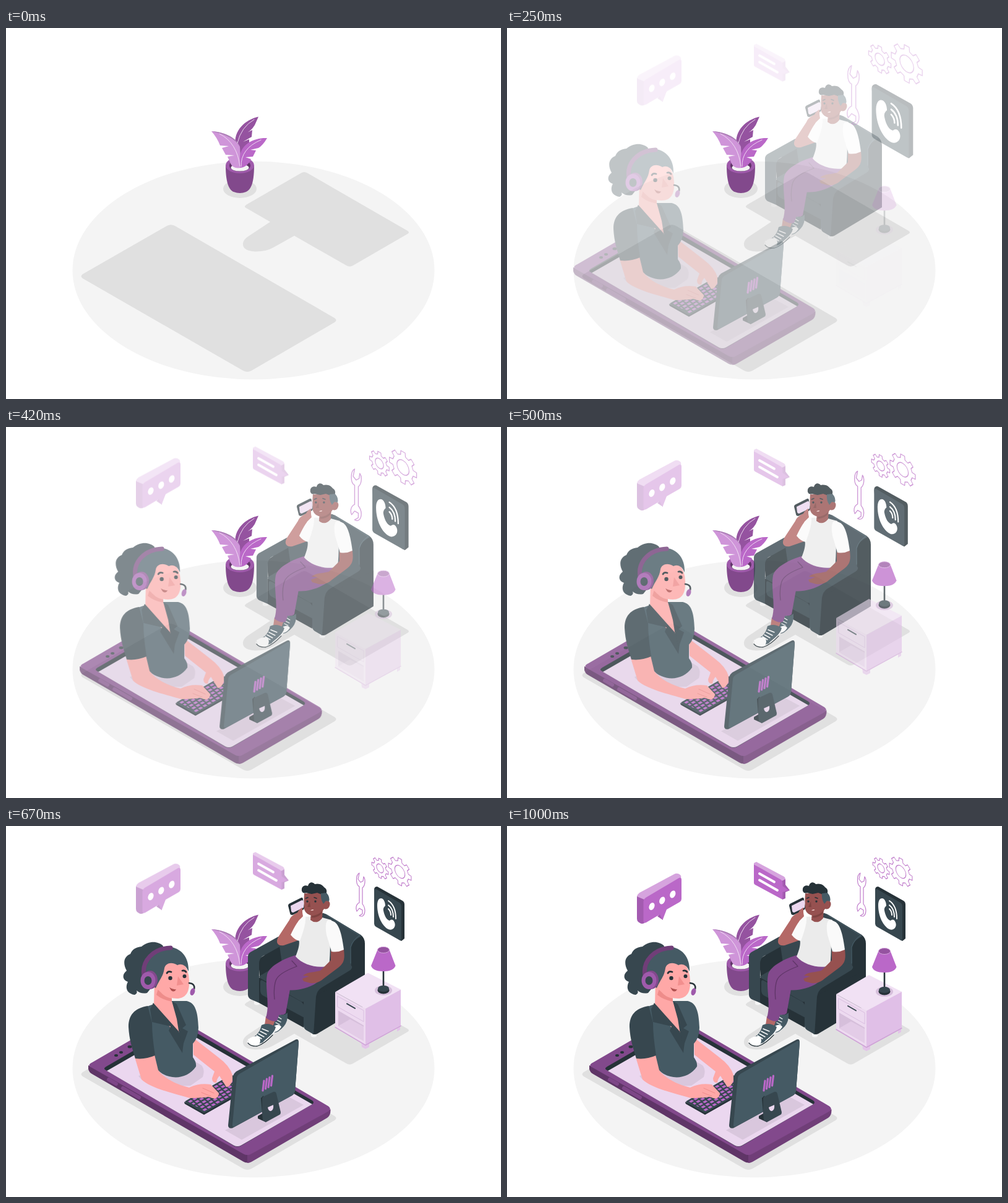
Animation, 800 px wide and 600 px high, one loop 1.04 s. Source, as an HTML page:

```html
<!DOCTYPE html>
<html lang="en">
<head>
<meta charset="utf-8">
<title>Phone support</title>
<style>
html, body { margin: 0; width: 100%; height: 100%; overflow: hidden; background: #fff; }
svg { display: block; width: 800px; height: 600px; }
.d { fill: #263238 } .m { fill: #37474f } .s { fill: #455a64 }
.p { fill: #ba68c8 } .q { fill: #82498c } .r { fill: #703e78 } .t { fill: #5f3567 }
.pale { fill: #ebd7ef } .haze { fill: #d9c7dd } .w { fill: #fff }
.skin { fill: #ffa8a7 } .tan { fill: #b46866 } .brown { fill: #965150 }
.line { fill: none; stroke-linecap: round; stroke-linejoin: round; }
</style>
</head>
<body>
<svg viewBox="0 0 800 600">
  <ellipse cx="400" cy="392" rx="292.5" ry="176.5" fill="#f4f4f4"/>
  <g fill="#e0e0e0">
    <path d="M260 320Q266.5 316.5 273 320L531 469Q536 472.5 531 476L397 554Q390 558 383 554L124 405Q119 401.5 124 398Z"/>
    <path d="M477 234.5Q482 231.500 487 234.500L649 328Q653 330.500 649 333L561 384Q555.500 387.500 550 384L466 336L432 355C418 363 396 363 388 358C380 353 382 344 390 338L427 313.500L388 291Q384 289 388 286Z"/>
    <ellipse cx="378" cy="260" rx="27" ry="15"/>
  </g>

  <g id="plant">
    <path class="q" d="M355 222C355 249 360 262 368 265Q378 269 388 265C397 261 401 248 401 222Z"/>
    <ellipse cx="378" cy="222" rx="23" ry="13" fill="#9f5aab"/>
    <ellipse cx="378" cy="222.500" rx="17" ry="9.500" class="t"/>
    <ellipse cx="378" cy="226" rx="14.500" ry="5.500" fill="#f4f4f4"/>
    <path fill="#9553a0" d="M408 143.500C387 148 367 166 371 190L376 212L384 203L393 188L393 180L383 184L397 176L398 165L386 171Q396 167 402 157Z"/>
    <path fill="#cf95d9" d="M332 167C352 168 373 178 378 192L380 226C369 228 364 223 362 217L358 208L369 206L355 205L349 194L360 191L346 190Q341 177 332 167Z"/>
    <path fill="#ab7fb5" d="M332 167C354 168 374 178 378 193Q370 175 332 167Z"/>
    <path class="p" d="M422 178C402 177 380 187 378 208L378 226C387 226 394 218 396 212L387 209L399 208L404 198L395 197L408 194Q415 190 422 178Z"/>
    <path class="line" stroke="#f3e5f5" stroke-width=".9" d="M345 171Q374 186 378 224M374 186Q380 160 401 148M380 224Q379 195 412 181"/>
  </g>

  <g id="chair">
    <path fill="#f5f5f5" d="M401 282h9v6q-4 3-9 0zM493 334h9v6q-4 3-9 0z"/>
    <path class="d" d="M420 195L498 144Q508 138 518 143L573 176Q580 181 580 190L580 285Q580 290 576 292L503 335L408 285Z"/>
    <path class="m" d="M420 195L498 144Q508 138 518 143L573 176L575 178Q561 184 557 196L558 228L500 262L425 250Z"/>
    <path class="line" stroke="#455a64" stroke-width="1.200" d="M518 144L572 177Q561 183 557 196L557 222"/>
    <path class="d" d="M408 215L442 194L446 222L410 248Z"/>
    <path class="m" d="M391 211Q391 207 395 204L440 179Q446 179 450 184L450 191L414 211Q409 216 409 222L409 286L395 280Q391 277 391 273Z"/>
    <path class="m" d="M409 243L440 225L540 235L484 283Q478 286 472 283L412 251Z"/>
    <path class="d" d="M409 245L481 286L481 326L409 286Z"/>
    <path class="m" d="M411 252Q411 248 415 250L477 284Q482 288 482 294L482 310L415 274Q411 271 411 266Z"/>
    <path class="d" d="M503 273L580 232L580 290L503 336Q499 338 495 336Z"/>
    <path class="m" d="M481 267Q481 260 487 256L541 224Q553 219 559 227Q560 231 555 234L509 262Q503 266 501 276L497 337L485 330Q481 327 481 323Z"/>

    <path class="q" d="M450 262L438 304Q446 308 452 303L459 264Z"/>
    <path class="tan" d="M420 308L436 310L433 326L418 322Z"/>
    <path class="s" d="M439 304Q448 308 455 302Q456 316 449 324Q440 334 434 334L430 327Z"/>
    <path class="w" d="M434 323Q442 319 445 325Q439 334 432 333Z"/>
    <path class="line" stroke="#fff" stroke-width="1.200" d="M440 309l5 3M438 314l6 3M436 318l6 3"/>
    <path class="w" d="M390 344Q390 353 402 354Q416 351 436 326L436 331Q418 355 402 357Q388 356 390 346Z"/>
    <path class="s" d="M393 344C402 341 410 336 413 322Q424 317 436 325C434 336 421 343 415 350Q404 355 397 352Z"/>
    <path class="w" d="M391 345Q401 338 409 341Q413 347 409 353Q400 356 393 353Z"/>
    <path class="line" stroke="#fff" stroke-width="1.500" d="M414 328l10 4M411 332l10 5M408 336l9 5M405 339l8 5"/>
    <path class="line" stroke="#263238" stroke-width="1.300" d="M391 351Q396 357 406 356Q418 352 431 338"/>
    <path class="q" d="M468 209C450 214 426 226 422 240C418 262 427 288 420 310Q430 318 438 315C443 300 451 286 455 265C475 268 505 258 519 238L522 225Z"/>
    <path class="line" stroke="#5f3567" stroke-width="1.300" d="M470 227Q440 238 436 250Q432 262 434 280M462 218Q466 222 470 227"/>

    <path class="tan" d="M475 184L449 193C438 195 435 187 441 178L458 152C460 146 466 143 470 140L478 134L480 146L473 153L461 177Z"/>
    <path d="M476 151Q484 144 493 148Q502 156 511 148L526 152C523 180 525 205 522 226C505 231 480 225 468 211C474 196 476 187 471 175Z" fill="#ebebeb"/>
    <path d="M484 146C472 150 467 162 460 176Q467 185 475 186C480 172 485 158 484 146Z" fill="#fafafa"/>
    <path class="brown" d="M525 202L546 200C548 216 546 222 537 229L513 247C506 254 495 256 488 253L481 251L479 247L490 243L480 242Q485 237 498 236L508 234L525 217Z"/>
    <path d="M519 153C535 151 541 163 546 200Q536 205 526 203L518 176Q515 160 519 153Z" fill="#fafafa"/>
    <path class="brown" d="M493 139L512 133L511 149Q502 160 492 152Z"/>
    <path class="brown" d="M482 109L511 107L519 121Q525 122 523 129Q521 136 514 134Q507 146 496 145Q485 144 482 135Q481 122 482 109Z"/>
    <path d="M494 145.500Q506 144 511 137L510 142Q502 149 494 148Z" fill="#7d4341"/>
    <path class="d" d="M478 105C477 97 483 95 488 97C489 91 495 89 499 94C507 92 512 96 514 99C519 102 519 106 517 111L511 111L503 108L494 110L485 108Q480 110 478 105Z"/>
    <path class="s" d="M509 109L518 108Q524 115 522 122L517 121L513 126Q508 119 509 109Z"/>
    <g class="d"><circle cx="487" cy="122" r="1.700"/><circle cx="500" cy="122" r="1.700"/></g>
    <path class="line" stroke="#263238" stroke-width="1.600" d="M484.500 117l3.500-1.500M498 115.500l4 1.500"/>
    <path d="M491 122L487 131L492 131Z" fill="#7d4341"/>
    <path d="M492 136.500Q495 134 497.500 135.500Q496 137.500 492 136.500Z" fill="#f6d5d3"/>
    <path class="d" d="M456 129Q456 126 459 125L477 116Q480 115 480 119L482 132Q482 135 479 136L463 144Q459 144 459 141Z"/>
    <path class="pale" d="M460 129L478 120Q481 120 481 123L481 132L464 140Q462 140 461 138Z"/>
    <path class="tan" d="M472 138Q476 133 479 132L479 144L472 152L467 149Z"/>
  </g>

  <g id="cabinet">
    <path fill="#e3c3e9" d="M536 324h5v11l-5-3zM574 352h7v12l-6-3zM581 354l6-2v9l-6 3zM632 325h5v8l-5 3z"/>
    <path fill="#f1e1f4" d="M532 272L585 241L638 268L581 299Z"/>
    <path fill="#eddaf0" d="M532 272L581 299L581 358L532 329Z"/>
    <path fill="#e0bfe7" d="M581 299L638 268L638 327L581 359Z"/>
    <path fill="#d6bfdb" d="M537 302L578 326L578 351L537 327Z"/>
    <path fill="#e3cce7" d="M537 327L556 316L578 328L578 351Z"/>
    <path class="line" stroke="#d9bfe0" d="M536 279L578 302L578 320L536 296Z"/>
    <path class="line" stroke="#cfa3d7" stroke-width="1.500" d="M532 329L581 358L638 327"/>
    <path class="line" stroke="#37474f" stroke-width="2" d="M551 291L564 298.500"/>
  </g>

  <g id="lamp">
    <ellipse cx="610" cy="268" rx="14" ry="8" fill="#d6bfdb"/>
    <path class="line" stroke="#263238" stroke-width="2.600" d="M610 236V264"/>
    <ellipse cx="610" cy="267.500" rx="9.500" ry="6" class="d"/>
    <ellipse cx="610" cy="265" rx="9" ry="5" class="m"/>
    <path class="p" d="M600.500 202L590 228Q593 237 610 237Q626 237 629.500 228L619.500 202Z"/>
    <ellipse cx="610" cy="202.500" rx="9.500" ry="5" fill="#9553a0" stroke="#d6a4de"/>
  </g>

  <g id="signs">
    <path class="d" d="M595 103Q595 98 600 98L641 121Q644 123 644 127L644 182L639 186L600 161Z"/>
    <path class="m" d="M595 104Q595 101 598 102L636 124Q639 126 639 130L639 183Q639 187 635 184L598 163Q595 161 595 158Z"/>
    <path class="w" d="M603 118C609 114 613 122 613 129Q609 132 610 137C612 147 616 152 620 153Q625 149 628 156C631 164 624 170 618 167C608 162 600 146 600 128Q600 121 603 118Z"/>
    <path class="line" stroke="#fff" stroke-width="1.900" d="M618 121Q630 129 630 150M618 128Q626 134 626 147M618 134Q622 138 622 144"/>
    <g id="outlines" class="line" stroke="#c07ccb" stroke-width="1.200">
      <path d="M571 76C565 79 565 95 571 98L571 124C565 127 565 134 567 138L571 133L576 136L576 142L571 145C580 150 583 135 576 126L576 100C581 96 581 86 578 82L577 89L573 91L569 86Z"/>
    </g>
  </g>

  <g id="desk">
    <path class="t" d="M133 387L133 393Q134 398 139 401L384 543Q390 546 396 543L390 526Z"/>
    <path class="r" d="M390 528L390 545Q393 545 397 543L519 472Q525 468 524.500 458Z"/>
    <path class="q" d="M139 382.500L262 311Q270 307 278 311L519 452Q528 457 520 462L396 530.500Q390 533.500 384 530.500L139 391Q130 387 139 382.500Z"/>
    <path class="line" stroke="#7d4687" stroke-width="6" d="M166 410L178 417M189 424L215 439"/>
    <path class="d" d="M162 389L276 323Q282 320 288 323L495 444Q499 447 495 450L380 517Q374 520 368 517L160 394Q157 392 162 389Z"/>
    <path class="pale" d="M163 396L276 331Q282 327 288 331L495 450L380 516.500Q374 519.500 368 516.500Z"/>
    <g class="d"><ellipse cx="178" cy="371" rx="3" ry="2"/><ellipse cx="186" cy="366" rx="3" ry="2"/><ellipse cx="200" cy="357" rx="3.500" ry="2.300"/></g>
    <path class="haze" d="M214 404C222 418 250 417 266 421L298 420L318 406Q322 394 316 387L304 380L245 395Z"/>
    <path class="haze" d="M354 492L381 507.500L481 451L455 437Z"/>

    <path class="d" d="M288 446L320 462L396 420L396 424L320 467L290 450Q288 449 288 446Z"/>
    <g transform="matrix(.866 -.5 .866 .5 288 446)">
      <rect width="88" height="37" rx="3" class="m"/>
      <g id="keys" stroke="#ba68c8" stroke-width="4" stroke-dasharray="5.500 2.500"/>
    </g>

    <path class="m" d="M254 194C246 186 231 185 219 195C210 196 204 199 201 207C191 211 188 221 195 234C187 240 188 249 197 252C192 261 195 271 208 273Q213 271 211 266Q218 272 228 270L240 255Z"/>
    <path class="skin" d="M240 250L239 290L270 350L290 330L268 284L268 270Z"/>
    <path d="M246 263Q254 277 268 279L268 284Q252 281 243 273Z" fill="#ee8c8a"/>
    <path class="skin" d="M240 240L258 221L284 219Q296 232 296 250C297 268 291 279 276 279C263 279 252 272 243 262Z"/>
    <path class="s" d="M222 250C217 215 238 195 262 195C284 197 296 213 295 235Q288 220 277 225C267 219 258 222 256 230C254 244 248 248 242 262Z"/>
    <path class="line" stroke="#703e78" stroke-width="7" stroke-linecap="butt" d="M223 242C219 218 238 198 266 197"/>
    <ellipse cx="233" cy="249" rx="12" ry="15" class="q"/>
    <ellipse cx="229.500" cy="250" rx="12" ry="14" fill="#9f5aab"/>
    <ellipse cx="229.500" cy="250" rx="6" ry="7" class="m"/>
    <g class="d"><circle cx="265.500" cy="246" r="3.200"/><circle cx="288.500" cy="243" r="3"/></g>
    <path class="line" stroke="#263238" stroke-width="2.800" d="M260 238Q262 234 267 236M285 234Q289 233 291 236"/>
    <path d="M278 243L287 256L276 258Z" fill="#f28f8e"/>
    <path d="M264 261Q270 265 275 264Q272 270 267 266Z" fill="#b0504f"/>
    <path class="line" stroke="#263238" stroke-width="2.500" d="M296 254Q306 255 304 264"/>
    <ellipse cx="301.500" cy="268" rx="3.700" ry="6" transform="rotate(18 301 268)" fill="#9f5aab"/>

    <path class="skin" d="M302 342L343 374Q362 388 366 403L366 412Q362 422 356 422L345 404Q341 408 340 415Q333 416 333 408L337 397L303 370Z"/>
    <path class="s" d="M236 289L222 294L234 350L244 393C258 410 291 413 307 389Q308 382 302 374L302 352Q311 342 311 326C310 300 306 286 292 283L268 283L285 331L281 345Z"/>
    <path class="m" d="M238 286L233 296L236 317L266 324L263 331L285 367L287 350L279 332Z"/>
    <path class="m" d="M268 283L276 288L291 322L285 327L294 332L285 357L279 331L276 312Z"/>
    <path class="skin" d="M208 374L219 410C232 423 268 432 297 440Q314 440 327 438L337 441Q344 439 344 432L331 418Q312 415 296 423C274 418 256 408 246 395L240 370Z"/>
    <path class="line" stroke="#ee8c8a" d="M318 424L336 432M316 431L331 437"/>
    <path class="m" d="M229 291C207 295 198 306 198 325C199 345 204 360 209 376Q225 378 241 371Q236 340 236 318Z"/>

    <path class="m" d="M367 404Q368 400 372 397L467 346Q473 343 473 350L467 429Q466 434 462 436L366 488.500Q359 490 359 484Z"/>
    <path class="s" d="M373 407Q374 403 377 401L469 348Q473 346.500 473 351L467 429Q466 433 462 436L370 486Q365 488 366 482Z"/>
    <path class="line" stroke="#ba68c8" stroke-width="3.200" d="M417 412l-2 16M421.500 409l-2 16M426 406.500l-2 16M430.500 404l-2 16"/>
    <path class="d" d="M412 440L416 436L420 479L407 473L407 469L414 465Z"/>
    <path class="m" d="M414 441Q414 438 417 437L432 430Q436 429 437 433L444 463Q444 466 442 467L420 479L415 476L414 466Z"/>
    <path class="pale" d="M423 455L432 451Q433 459 428 461Q424 461 423 455Z"/>
  </g>

  <g id="bubbles">
    <path fill="#a35bb0" d="M210 113L222 118L222 157Q218 159 215 157L212 155Q210 153 210 150ZM243 146L252 138L252 152Z"/>
    <path fill="#d6a4de" d="M210 114Q211 110 214 108L270 78Q275 75 280 79Q282 81 281 84L222 119Z"/>
    <path class="p" d="M220.500 122Q221 118 224 116L278 84Q282 82 282 87L282 118Q282 121 279 123L258 135L251.500 152L247 143L225 156Q220.500 158 220.500 154Z"/>
    <g class="w"><ellipse cx="234" cy="130" rx="4.300" ry="6.300" transform="rotate(22 234 130)"/><ellipse cx="251" cy="120.500" rx="4.300" ry="6.300" transform="rotate(22 251 120)"/><ellipse cx="268" cy="110.500" rx="4.300" ry="6.300" transform="rotate(22 268 110)"/></g>
    <path fill="#d6a4de" d="M399 62L399 60L403 58L448 82Q450 84 450 86L445 90Z"/>
    <path fill="#a35bb0" d="M444 89L450 86L450 95L457 104L450 107L450 117L445 119Z"/>
    <path class="p" d="M399 62L443 87Q445.500 89 445.500 92L445.500 97L455 104L445.500 107L445.500 119L401 95Q399 94 399 92Z"/>
    <path class="line" stroke="#fff" stroke-width="3.800" d="M408 77L432 90.500M408 87.500L437 104"/>
  </g>
</svg>
<script>
const $ = id => document.getElementById(id);
const LOOP = 1040, FPS = 24;

// Progress at every sixth of a second
const slide = [0, .18, .47, .79, 1, 1.05, 1];
const lift = [0, .07, .31, .71, 1.03, 1.1, 1];
const late = [0, 0, .12, .59, 1.04, 1.15, 1];
const drift = [0, .06, .2, .38, .57, .78, 1];

function sample(table, sec) {
  const x = Math.min(sec * 6, 6), i = Math.min(Math.floor(x), 5), u = x - i;
  const at = k => table[Math.max(0, Math.min(6, k))];
  const a = at(i - 1), b = at(i), c = at(i + 1), d = at(i + 2);
  return b + u / 2 * (c - a + u * (2 * a - 5 * b + 4 * c - d + u * (3 * (b - c) + d - a)));
}

const move = (x, y) => rest => `translate(${x * rest} ${y * rest})`;
const zoom = rest => `translate(610 118) scale(${1 + .53 * rest}) translate(-610 -118)`;
const parts = [
  ['desk', slide, move(-38, 0)],
  ['chair', slide, move(38, 0)],
  ['signs', slide, zoom],
  ['lamp', lift, move(0, 70)],
  ['cabinet', late, move(0, 90)],
  ['bubbles', drift, move(0, -37)]
];

function gear(cx, cy, r, hole) {
  const teeth = 8, pts = [];
  for (let i = 0; i < teeth; i++)
    for (const [k, f] of [[-.3, .76], [-.2, 1], [.2, 1], [.3, .76]]) {
      const a = (i + k) / teeth * 2 * Math.PI;
      pts.push((r * f * Math.cos(a)).toFixed(2) + ' ' + (r * f * Math.sin(a)).toFixed(2));
    }
  return `<g transform="matrix(.866 .5 0 1 ${cx} ${cy})"><path d="M${pts.join('L')}Z"/><circle r="${hole}"/></g>`;
}
$('outlines').innerHTML += gear(604.5, 68.5, 15.5, 6.5) + gear(636.5, 74, 21.5, 9.5);
$('keys').innerHTML = [5, 11.7, 18.4, 25.1, 31.8]
  .map((y, i) => `<path d="M4 ${y}H84" stroke-dashoffset="${i * 2}"/>`).join('');

function draw(ms) {
  const n = Math.floor(ms * FPS / 1000 + .1);
  const sec = n < 2 ? 0 : Math.min(n / FPS, 1);
  for (const [id, table, place] of parts) {
    const p = sample(table, sec), el = $(id);
    el.setAttribute('transform', place(1 - p));
    el.setAttribute('opacity', Math.max(0, Math.min(1, p)));
  }
}

const start = performance.now();
function tick() {
  draw((performance.now() - start) % LOOP);
  requestAnimationFrame(tick);
}
tick();
</script>
</body>
</html>
```
